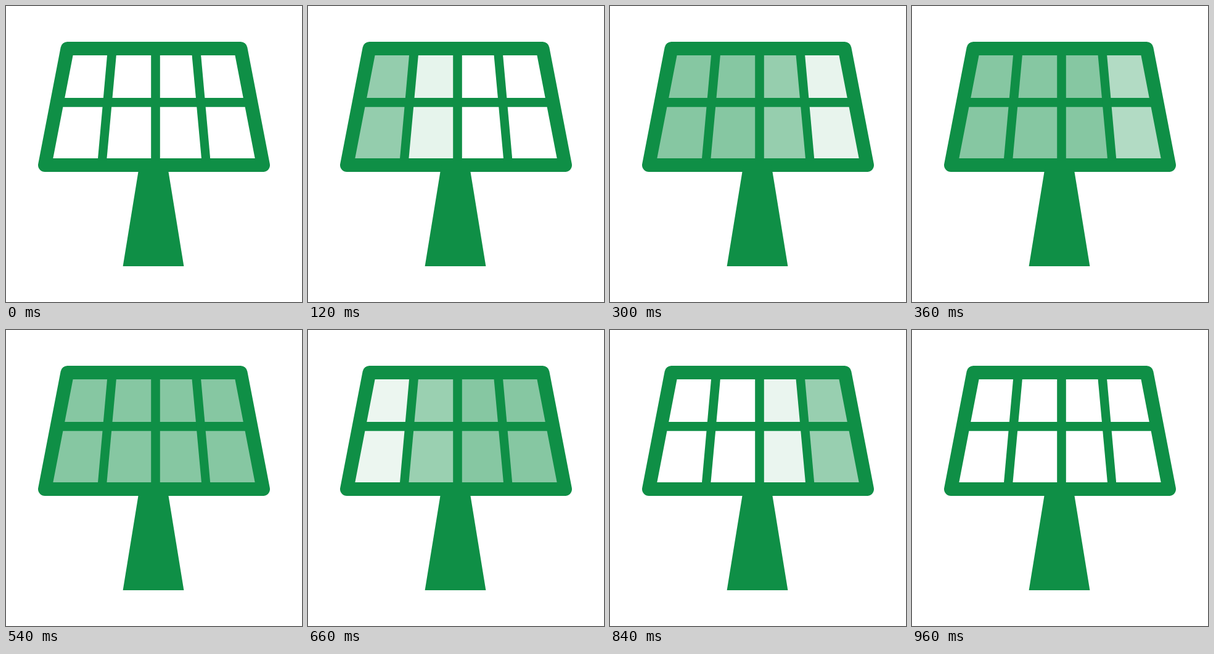
Animation of 480x480 px, one loop 1.02 s. Source, as an HTML page:

```html
<!DOCTYPE html>
<html lang="en">
<head>
<meta charset="utf-8">
<title>Solar panel</title>
<style>
  html, body { margin: 0; width: 100%; height: 100%; overflow: hidden; background: #fff; }
  svg { display: block; width: 100%; height: 100%; }
</style>
</head>
<body>
<svg viewBox="0 0 480 480" fill="#0f8f46">
  <g id="columns">
    <path opacity="0" d="M99 70H172L156 257H64Z"/>
    <path opacity="0" d="M172 70H242.5V257H156Z"/>
    <path opacity="0" d="M242.5 70H308L324 257H242.5Z"/>
    <path opacity="0" d="M308 70H381L416 257H324Z"/>
  </g>
  <path d="M99.5 69H380.5L417 258H63Z" fill="none" stroke="#0f8f46" stroke-width="22" stroke-linejoin="round"/>
  <path d="M85 149H395V163.7H82Z"/>
  <path d="M164.4 76H179.2L163 252H148.6Z"/>
  <path d="M235.2 76H249.8V252H235.2Z"/>
  <path d="M301.2 76H315.8L331.6 252H317.4Z"/>
  <path d="M216.3 258H261.7L288.4 422H189.6Z"/>
</svg>
<script>
  const LOOP = 1020, STEP = 60;
  const FADE = 133, STAGGER = 91, IN = 2, OUT = 548, MAX = 0.5;
  const columns = [...document.querySelectorAll('#columns path')];
  const ramp = t => Math.min(1, Math.max(0, t / FADE));
  const start = performance.now();

  function draw(now) {
    const elapsed = Math.max(0, now - start) % LOOP;
    const t = Math.floor(elapsed / STEP) * STEP;
    columns.forEach((column, i) => {
      const local = t - i * STAGGER;
      column.setAttribute('opacity', MAX * (ramp(local - IN) - ramp(local - OUT)));
    });
    requestAnimationFrame(draw);
  }
  draw(start);
</script>
</body>
</html>
```
